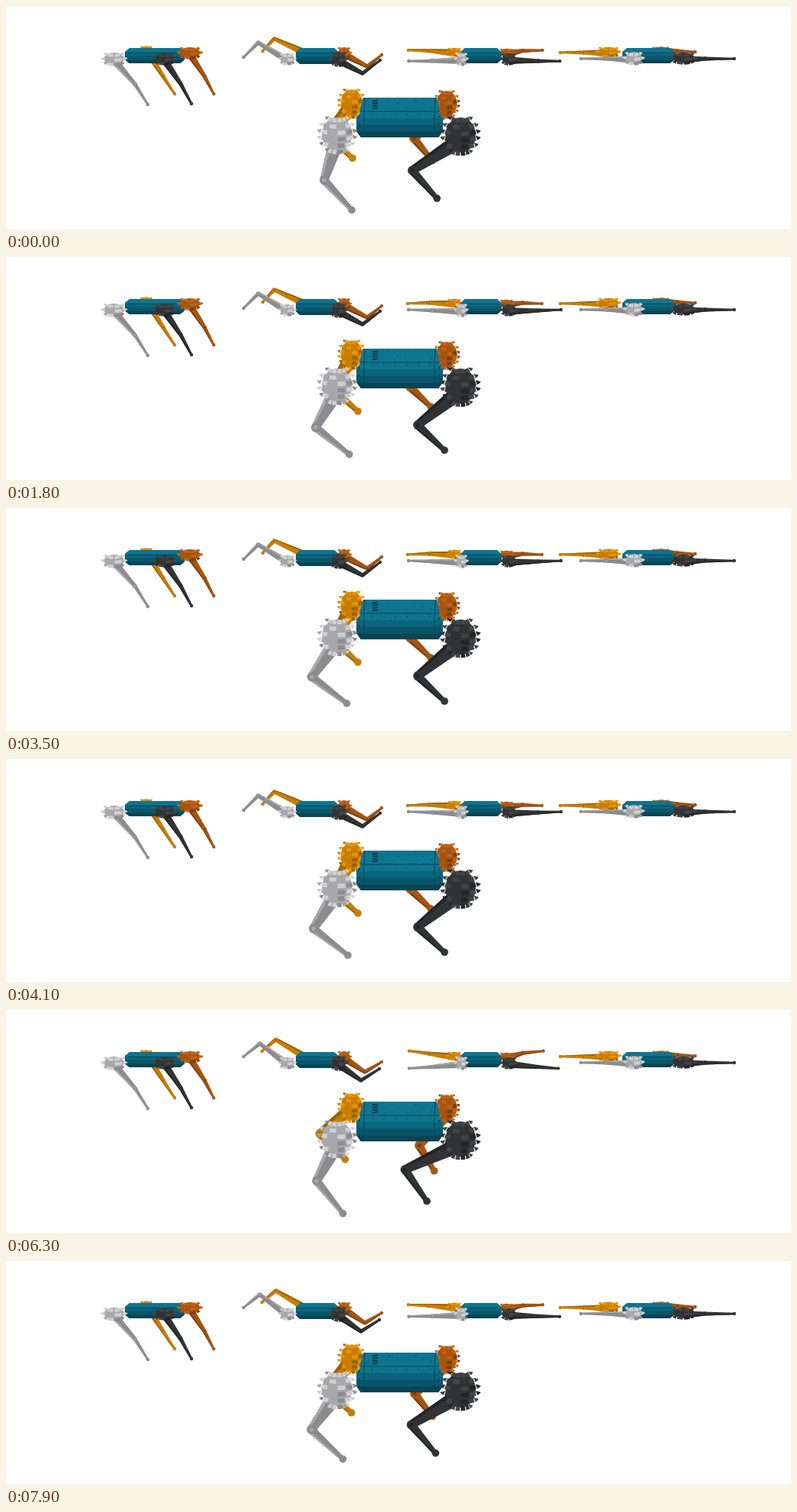
An HTML page with a canvas for the animation above (8000 ms loop, 1024 by 292 pixels).

```html
<!DOCTYPE html>
<html lang="en">
<head>
<meta charset="utf-8">
<title>Walking robot</title>
<style>
html, body { margin: 0; width: 100%; height: 100%; overflow: hidden; background: #fff; }
canvas { display: block; width: 1024px; height: 292px; }
</style>
</head>
<body>
<canvas id="stage" width="1024" height="292"></canvas>
<script>
const ctx = document.getElementById('stage').getContext('2d');
const LOOP = 8000, STEP = 100;

// light, middle, dark
const WHITE = ['#d0d0d2', '#a8a8aa', '#8c8c8f'];
const AMBER = ['#e89206', '#c87e04', '#9a6103'];
const RUST = ['#c06316', '#a65512', '#7c400e'];
const BLACK = ['#424445', '#313334', '#242626'];
const TEAL = ['#0e7590', '#0b657d', '#09566b', '#074455'];

const clamp = v => Math.min(1, Math.max(0, v));
const ease = v => (1 - Math.cos(Math.PI * clamp(v))) / 2;
const hash = n => { const v = Math.sin(n * 12.9898 + 4.1) * 43758.5453; return v - Math.floor(v); };

const STRIDE = [[0, 1], [1800, 0.2], [2800, -0.35], [4100, 0], [5100, -1], [6300, 0.3], [7900, -0.2]];

function strideAt(t) {
  const i = Math.max(1, STRIDE.findIndex(([time]) => time >= t));
  const [[t0, a], [t1, b]] = [STRIDE[i - 1], STRIDE[i]];
  return a + (b - a) * clamp((t - t0) / (t1 - t0));
}

// Three motions drive every leg.
const gait = t => ({
  stride: strideAt(Math.min(t, 7900)),
  splay: Math.max(0, Math.cos(2 * Math.PI * (t / LOOP - 0.84))) ** 1.5,
  settle: ease((t - 4100) / 1000)
});

// hip [x, y, rx, ry]; pose and moves are [knee x, knee y, foot x, foot y]
const leg = (color, hip, pose, moves = {}) => ({ color, hip, pose, moves });

const robots = [
  {
    body: [155, 55, 78, 20],
    back: [leg(AMBER, [183, 56, 10, 4], [205, 92, 220, 115])],
    front: [
      leg(WHITE, [141, 69, 16, 9], [168, 102, 185, 129]),
      leg(RUST, [240, 61, 16, 8], [259, 92, 271, 115]),
      leg(BLACK, [207, 69, 15, 8], [228, 102, 242, 128])
    ]
  },
  {
    body: [378, 55, 56, 21],
    back: [
      leg(AMBER, [390, 60, 9, 5], [350, 43, 335, 59], { settle: [2, -4, -1, -5] }),
      leg(RUST, [441, 61, 9, 8], [471, 79, 490, 64], { settle: [-3, 2, 0, 4] })
    ],
    front: [
      leg(WHITE, [367, 69, 11, 8], [329, 48, 310, 67], { settle: [2, -4, 0, -6] }),
      leg(BLACK, [434, 69, 11, 10], [465, 88, 488, 71], { settle: [-2, 4, -1, 6] })
    ]
  },
  {
    body: [593, 55, 53, 20],
    back: [
      leg(AMBER, [585, 60, 10, 6], [552, 60, 524, 61], { splay: [0, -3, 2, -8] }),
      leg(RUST, [653, 61, 10, 6], [674, 60, 699, 61], { splay: [0, -4, 2, -8] })
    ],
    front: [
      leg(WHITE, [594, 69, 8, 9], [556, 70, 525, 69], { splay: [0, 5, 1, 8] }),
      leg(BLACK, [656, 69, 11, 8], [694, 70, 724, 69], { splay: [0, 5, -4, 8] })
    ]
  },
  {
    body: [804, 55, 68, 20],
    back: [
      leg(AMBER, [786, 60, 16, 7], [753, 61, 723, 61]),
      leg(RUST, [854, 57, 14, 4], [876, 59, 899, 60])
    ],
    front: [
      leg(WHITE, [819, 68, 13, 9], [783, 69, 750, 69]),
      leg(BLACK, [884, 68, 17, 8], [912, 69, 950, 69])
    ]
  },
  {
    big: true,
    body: [457, 138, 113, 34],
    back: [
      leg(AMBER, [451, 127, 17, 20], [426, 172, 459, 202], { splay: [-18, -11, -18, -7] }),
      leg(RUST, [575, 128, 16, 19], [527, 170, 554, 196], { splay: [13, 8, 5, 16] })
    ],
    front: [
      leg(WHITE, [432, 168, 24, 25], [401, 222, 446, 257], { stride: [14, 6, 9, 7], splay: [0, 0, -10, 8] }),
      leg(BLACK, [593, 169, 24, 26], [537, 220, 572, 253], { splay: [-18, -12, -25, -3] })
    ]
  }
];

function polygon(points, fill) {
  ctx.beginPath();
  for (const [x, y] of points) ctx.lineTo(x, y);
  ctx.closePath();
  ctx.fillStyle = fill;
  ctx.fill();
}

function disc(x, y, r, fill) {
  ctx.beginPath();
  ctx.arc(x, y, r, 0, 7);
  ctx.fillStyle = fill;
  ctx.fill();
}

function line(x1, y1, x2, y2, color, width = 1) {
  ctx.beginPath();
  ctx.moveTo(x1, y1);
  ctx.lineTo(x2, y2);
  ctx.strokeStyle = color;
  ctx.lineWidth = width;
  ctx.stroke();
}

// Tapered bar with a second tone along one edge.
function taper(x1, y1, x2, y2, w1, w2, base, edge) {
  const len = Math.hypot(x2 - x1, y2 - y1);
  const nx = (y1 - y2) / len / 2, ny = (x2 - x1) / len / 2;
  const strip = (a, b, fill) => polygon([
    [x1 + nx * w1 * a, y1 + ny * w1 * a], [x2 + nx * w2 * a, y2 + ny * w2 * a],
    [x2 + nx * w2 * b, y2 + ny * w2 * b], [x1 + nx * w1 * b, y1 + ny * w1 * b]], fill);
  strip(-1, 1, base);
  strip(0.5, 1, edge);
}

// Cage-like joint: a solid core wrapped in curved, broken bands.
function drawHip([x, y, rx, ry], color) {
  const big = ry > 15;
  const bands = big ? 6 : 3;
  const h = 2 * ry / bands;
  ctx.save();
  ctx.translate(x, y);
  ctx.beginPath();
  ctx.ellipse(0, 0, rx * 0.82, ry * 0.88, 0, 0, 7);
  ctx.fillStyle = color[1];
  ctx.fill();
  for (let i = 0; i < bands; i++) {
    const cy = -ry + (i + 0.5) * h;
    const half = rx * Math.sqrt(1 - (cy / ry) ** 2);
    const plates = big ? 6 : 4;
    for (let k = 0; k < plates; k++) {
      const a = Math.PI * (k + 0.12) / plates, b = Math.PI * (k + 0.95) / plates;
      const v = hash(i * 17 + k * 5);
      ctx.beginPath();
      ctx.ellipse(0, cy - h * 0.3, half, h * 0.6, 0, a, b);
      ctx.strokeStyle = color[v < 0.45 ? 0 : v < 0.75 ? 1 : 2];
      ctx.lineWidth = h * 0.65;
      ctx.stroke();
    }
  }
  ctx.restore();
}

function drawLeg({ color, hip, pose, moves }, size, now) {
  const [kx, ky, fx, fy] = pose.map((p, i) =>
    Object.entries(moves).reduce((sum, [name, shift]) => sum + shift[i] * now[name], p));
  const [light, mid, dark] = color;
  const base = color === WHITE ? dark : mid;
  const edge = color === WHITE ? mid : dark;
  taper(hip[0], hip[1] + hip[3] * 0.25, kx, ky, 9.5 * size, 5 * size, base, edge);
  taper(kx, ky, fx, fy, 5 * size, 2.7 * size, base, edge);
  disc(kx, ky, 2.7 * size, base);
  disc(kx, ky, 1.2 * size, edge);
  disc(fx, fy, 2.2 * size, base);
  drawHip(hip, color);
}

function drawBands([x, y, w, h]) {
  const cx = Math.min(6, w * 0.1), cy = h * 0.25;
  ctx.save();
  ctx.beginPath();
  ctx.moveTo(x + cx, y);
  ctx.lineTo(x + w - cx, y);
  ctx.lineTo(x + w, y + cy);
  ctx.lineTo(x + w, y + h - cy);
  ctx.lineTo(x + w - cx, y + h);
  ctx.lineTo(x + cx, y + h);
  ctx.lineTo(x, y + h - cy);
  ctx.lineTo(x, y + cy);
  ctx.clip();
  TEAL.forEach((color, i) => {
    ctx.fillStyle = color;
    ctx.fillRect(x, y + h * i * 0.26, w, h);
  });
  ctx.restore();
}

function drawBody(box, big) {
  const [x, y, w, h] = box;
  const lid = big ? 18 : 0;
  if (big) polygon([[x + 9, y - lid], [x + w - 8, y - lid], [x + w - 4, y], [x + 4, y]], TEAL[0]);
  drawBands(box);
  if (!big) {
    line(x + 4, y + 6.5, x + w - 4, y + 6.5, TEAL[3], 0.7);
    return;
  }
  line(x + 5, y, x + w - 4, y, TEAL[3], 1.2);
  for (const [top, bottom] of [[11, 10], [w - 10, w - 11]]) {
    line(x + top, y - lid, x + bottom, y, TEAL[3]);
    line(x + bottom, y + 1, x + bottom, y + h - 1, TEAL[3]);
  }
  for (let i = 0; i < 4; i++) line(x + 21, y - 13.5 + i * 3.3, x + 28, y - 14.5 + i * 3.3, '#07343f', 1.8);
  for (let i = 0; i < 6; i++) {
    disc(x + 43 + i * 11, y - 14 + (i % 3) * 4, 0.7, TEAL[3]);
    disc(x + 21 + i * 15, y + 4, 0.7, TEAL[3]);
    disc(x + 4 + (i % 2) * (w - 9), y + 7 + (i >> 1) * 10, 1.2, TEAL[3]);
  }
}

function draw(t) {
  const now = gait(t);
  ctx.fillStyle = '#fff';
  ctx.fillRect(0, 0, 1024, 292);
  for (const { body, back, front, big } of robots) {
    const size = big ? 2.2 : 1;
    back.forEach(part => drawLeg(part, size, now));
    drawBody(body, big);
    front.forEach(part => drawLeg(part, size, now));
  }
}

const start = performance.now();
function tick() {
  const t = (performance.now() - start) % LOOP;
  draw(Math.floor(t / STEP) * STEP);
  requestAnimationFrame(tick);
}
tick();
</script>
</body>
</html>
```
